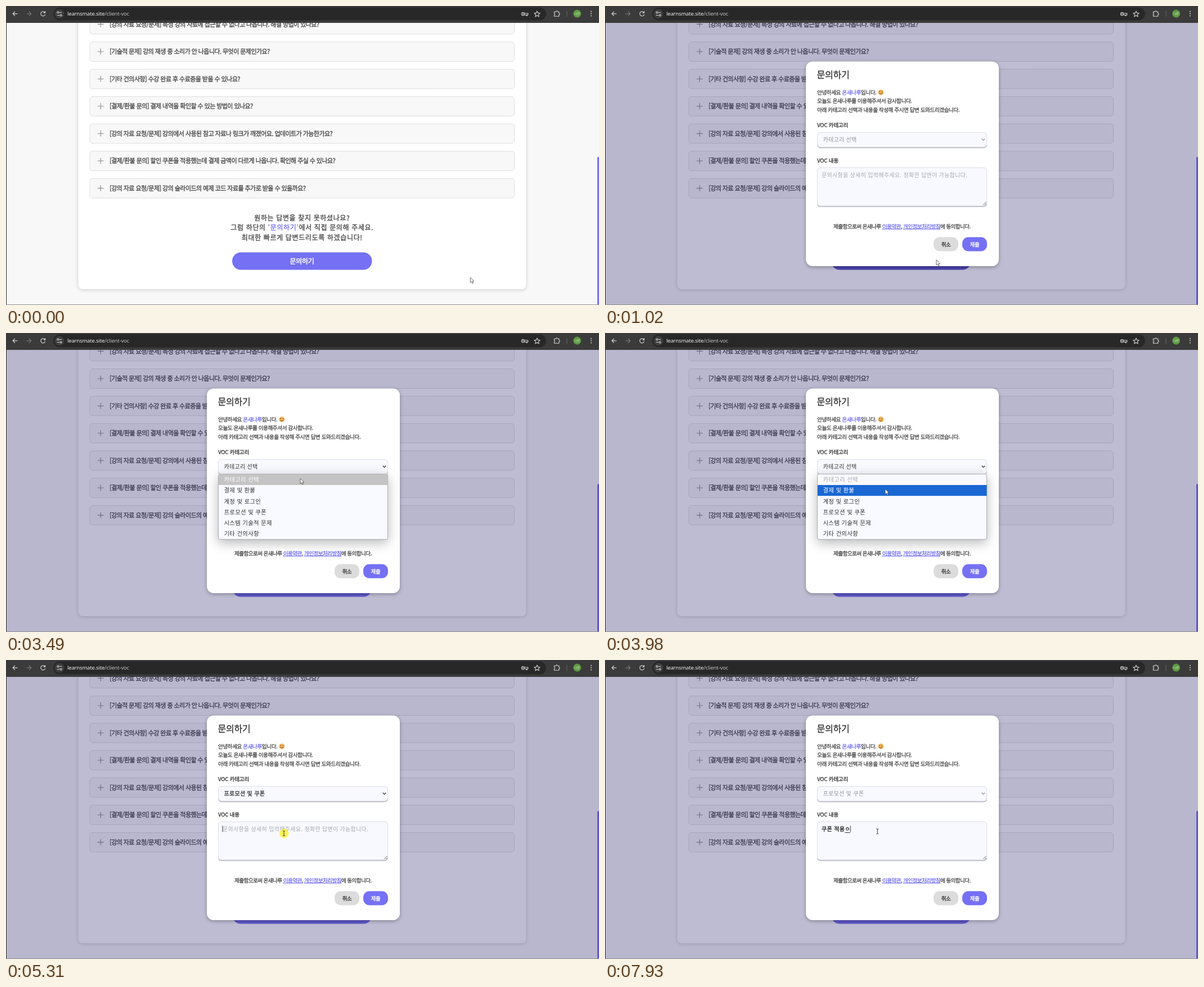
Animation of 1054 by 531 pixels, one loop 8000 ms. Source, as an HTML page:

```html
<!DOCTYPE html>
<html lang="ko">
<head>
<meta charset="utf-8">
<title>문의하기</title>
<style>
html, body { margin: 0; width: 100%; height: 100%; overflow: hidden; background: #f8f8f9; }
svg { display: block; width: 1054px; height: 531px; }
text { font-family: "Noto Sans CJK KR", "Noto Sans CJK", "Noto Sans", sans-serif; white-space: pre; }
.url { font-family: "Noto Sans", "Open Sans", sans-serif; }
.card { filter: drop-shadow(0 1px 3px rgba(0,0,0,.18)); }
.modal { filter: drop-shadow(0 2px 3px rgba(0,0,0,.3)); }
.menu { filter: drop-shadow(0 6px 10px rgba(0,0,0,.28)); }
</style>
</head>
<body>
<svg id="stage" viewBox="0 0 1054 531"></svg>
<script>
const LOOP = 8000;
const BRAND = '온새나루';
const PURPLE = '#7570f4', HOVER = '#5a54c9';
// outline widths that thicken the regular face
const MEDIUM = 0.3, SEMI = 0.45;

const rect = (x, y, w, h, r, fill, more = '') =>
  `<rect x="${x}" y="${y}" width="${w}" height="${h}" rx="${r}" fill="${fill}" ${more}/>`;
const line = (d, stroke, w = 1, more = '') =>
  `<path d="${d}" fill="none" stroke="${stroke}" stroke-width="${w}" ${more}/>`;
const text = (x, y, s, size, gap, fill, heavy = 0, more = '') =>
  `<text x="${x}" y="${y}" font-size="${size}" letter-spacing="${gap}" fill="${fill}" stroke="${fill}" stroke-width="${heavy}" ${more}>${s}</text>`;
const mid = 'text-anchor="middle"';
const group = (id, body, more = '') => `<g id="${id}" ${more}>${body}</g>`;
const span = (s, more = '') => `<tspan fill="${PURPLE}" stroke="${PURPLE}" ${more}>${s}</tspan>`;

const questions = [
  '[강의 자료 요청/문제] 특정 강의 자료에 접근할 수 없다고 나옵니다. 해결 방법이 있나요?',
  '[기술적 문제] 강의 재생 중 소리가 안 나옵니다. 무엇이 문제인가요?',
  '[기타 건의사항] 수강 완료 후 수료증을 받을 수 있나요?',
  '[결제/환불 문의] 결제 내역을 확인할 수 있는 방법이 있나요?',
  '[강의 자료 요청/문제] 강의에서 사용된 참고 자료나 링크가 깨졌어요. 업데이트가 가능한가요?',
  '[결제/환불 문의] 할인 쿠폰을 적용했는데 결제 금액이 다르게 나옵니다. 확인해 주실 수 있나요?',
  '[강의 자료 요청/문제] 강의 슬라이드의 예제 코드 자료를 추가로 받을 수 있을까요?'
];
const options = ['카테고리 선택', '결제 및 환불', '계정 및 로그인', '프로모션 및 쿠폰', '시스템 기술적 문제', '기타 건의사항'];
const rowTop = i => 250.7 + i * 19.25;

function page() {
  const items = questions.map((q, i) => {
    const y = 32.4 + i * 48.53;
    return rect(149, y - 17.2, 754.5, 34.6, 5, '#f8f8f8', 'stroke="#dedede"') +
      line(`M162.8 ${y}h10.8M168.2 ${y - 5.4}v10.8`, '#8a8a8a', 1.1) +
      text(184, y + 4.1, q, 11, -0.56, '#444', MEDIUM);
  }).join('');
  const note = (y, s) => text(526.3, y, s, 12, 0.64, '#444', MEDIUM, mid);
  return rect(0, 30, 1054, 501, 0, '#f8f8f9') +
    rect(128.5, -20, 796, 523, 8, '#fff', 'class="card"') + items +
    note(381, '원하는 답변을 찾지 못하셨나요?') +
    note(398, `그럼 하단의 ${span("'문의하기'")}에서 직접 문의해 주세요.`) +
    note(415.5, '최대한 빠르게 답변드리도록 하겠습니다!') +
    rect(402, 437.6, 248.5, 30.9, 15.4, PURPLE, 'id="ask"') +
    text(525.7, 457.6, '문의하기', 12.5, -0.75, '#fff', SEMI, mid) +
    rect(1051, 268, 4, 263, 2, PURPLE);
}

function field(y, h) {
  return rect(377, y + 1, 302, h, 6, '#b9bac2') +
    rect(377.5, y + 0.5, 301, h - 1.5, 5.5, '#f8f9fe', 'stroke="#dddee6"');
}

function smiley() {
  return '<circle cx="490.3" cy="153.4" r="4.9" fill="#f0b055"/>' +
    line('M487 152.5q1.1-1.7 2.2 0M491.4 152.5q1.1-1.7 2.2 0M487.5 155q2.8 2.4 5.6 0', '#6b4520', 0.8);
}

function dialog() {
  const under = 'text-decoration="underline"';
  const small = (x, y, s, gap = -0.43, more = '') => text(x, y, s, 9.6, gap, '#4a4a4a', MEDIUM, more);
  const button = (x, fill, s, ink) => rect(x, 410.5, 44, 25, 11, fill) +
    text(x + 22, 426.6, s, 9.4, -0.3, ink, MEDIUM, mid);
  return rect(0, 30, 1054, 501, 0, 'rgb(42,35,108)', 'opacity=".3"') +
    rect(357, 98.5, 343, 363.5, 12, '#fff', 'class="modal"') +
    text(376.5, 128, '문의하기', 16, -0.2, '#333', MEDIUM) +
    small(377, 157, `안녕하세요 ${span(BRAND)}입니다.`) + smiley() +
    small(377, 172.4, `오늘도 ${BRAND}를 이용해주셔서 감사합니다.`) +
    small(377, 187.7, '아래 카테고리 선택과 내용을 작성해 주시면 답변 도와드리겠습니다.') +
    text(377, 215, 'VOC 카테고리', 9.6, -0.2, '#333', MEDIUM) +
    field(224, 27.5) +
    text(387.5, 240.6, '', 10, 0.3, '#333', 0, 'id="choice"') +
    line('M669.8 235.8l2.7 2.8 2.7-2.8', '#333', 1.3, 'id="chevron"') +
    text(377, 277.7, 'VOC 내용', 9.6, -0.2, '#333', MEDIUM) +
    field(286.5, 69.5) +
    line('M672 353.5l5.5-5.5M675 353.8l2.7-2.7', '#555', 0.9) +
    text(385, 304, '문의사항을 상세히 입력해주세요. 정확한 답변이 가능합니다.', 10, 0.3, '#a8aab2', 0, 'id="hint"') +
    text(385, 304, '', 10, 0.33, '#222', MEDIUM, 'id="typed"') +
    rect(0, 306, 9.3, 0.9, 0, '#222', 'id="compose"') +
    rect(384.5, 294.5, 0.9, 11, 0, '#222', 'id="caret"') +
    small(527.8, 394.6, `제출함으로써 ${BRAND} ${span('이용약관', under)}, ${span('개인정보처리방침', under)}에 동의합니다.`, -0.58, mid) +
    button(584, '#dcdcdc', '취소', '#333') + button(635, PURPLE, '제출', '#fff') +
    group('menu',
      rect(377.5, 250.5, 301, 116, 3, '#f9faff', 'class="menu" stroke="#a9abb5"') +
      rect(378, 0, 300.5, 19.25, 0, '#1967d2', 'id="pick"') +
      options.map((s, i) => text(387.5, rowTop(i) + 13.3, s, 10.4, 0.3, '#333', 0, 'class="opt"')).join(''));
}

function toolbar() {
  const c = '#d5d5d5';
  return rect(0, 0, 1054, 30, 0, '#3b3b3b') +
    rect(84, 2.5, 876, 23, 11.5, '#282828') +
    line('M20.5 13.8h-8M16 10l-3.8 3.8 3.8 3.8', c, 1.2) +
    line('M36.5 13.8h8M41 10l3.8 3.8-3.8 3.8', '#777', 1.2) +
    line('M69 11.3a4 4 0 1 0 .7 3.6M69.6 9.3v2.8h-2.8', c, 1.2) +
    '<circle cx="95" cy="14" r="8.5" fill="#3e3e3e"/>' +
    line('M95 11.5h4.2M95 16.5h-4.2', c, 1.2) +
    `<g fill="none" stroke="${c}" stroke-width="1.1"><circle cx="92.4" cy="11.5" r="1.5"/><circle cx="97.6" cy="16.5" r="1.5"/>` +
    '<circle cx="919" cy="14.2" r="2.6"/><path d="M921.6 13h6.2v2.8h-1.4v1.3h-1.8v-1.3h-3"/>' +
    '<path d="M944 9.2l1.5 3.2 3.5.4-2.6 2.4.7 3.5-3.1-1.8-3.1 1.8.7-3.5-2.6-2.4 3.5-.4z"/>' +
    '<path d="M974.5 10.2h3a1.4 1.4 0 0 1 2.8 0h2.5v2.6a1.4 1.4 0 0 1 0 2.8v2.7h-8.3v-2.6a1.5 1.5 0 0 0 0-2.8z"/></g>' +
    `<circle cx="919" cy="14.2" r=".9" fill="${c}"/>` +
    text(109, 17.4, 'learnsmate.site<tspan fill="#bdbdbd">/client-voc</tspan>', 9.5, -0.18, '#eee', 0, 'class="url"') +
    line('M997 9v10', '#666') +
    '<circle cx="1015.2" cy="13.6" r="7" fill="#5d9a41"/>' +
    text(1015.2, 15.6, '나무', 5.4, -0.2, '#e8f2e2', 0, mid) +
    [9.8, 13.6, 17.4].map(y => `<circle cx="1040" cy="${y}" r="1" fill="${c}"/>`).join('');
}

const pointers =
  group('glow', '<circle r="8.3" fill="#fff01e"/>') +
  group('arrow', '<path d="M0 0v9.4l2.2-2 1.5 3.4 1.5-.7-1.5-3.3h3z" fill="#fff" stroke="#333" stroke-width=".7" stroke-linejoin="round"/>') +
  group('hand', '<path d="M-.9 1a1 1 0 0 1 2 0v3.4l4 .8q1 .3.9 1.4l-.5 3.2-1 2.8h-4.3l-3-4.2q-.5-1 .6-1.2l1.3 1z" fill="#fff" stroke="#222" stroke-width=".7" stroke-linejoin="round"/>') +
  group('beam', line('M-2-4.5q2 0 2 1v7q0 1-2 1M2-4.5q-2 0-2 1M2 4.5q-2 0-2-1', '#333', 1));

const stage = document.getElementById('stage');
stage.innerHTML = page() + group('dialog', dialog()) + toolbar() +
  rect(0, 30, 1, 501, 0, '#2b2b2b') + rect(0, 530, 1054, 1, 0, '#8d8d92') + pointers;

const el = id => document.getElementById(id);
const show = (id, on) => el(id).setAttribute('visibility', on ? 'inherit' : 'hidden');
const within = (t, a, b) => t >= a && t < b;
const latest = (steps, t) => steps.reduce((v, s) => t >= s[0] ? s[1] : v, steps[0][1]);

// start, end, x, y reached
const moves = [
  [0, 0, 825.3, 482], [110, 120, 824.7, 481.4], [200, 840, 588.9, 450.8],
  [1450, 2130, 567, 230.5], [2950, 3770, 507, 268.5], [3780, 3980, 498, 277],
  [4240, 4710, 476, 318.5], [5020, 5260, 494, 308], [5380, 5450, 484.3, 304.3]
];
function cursorAt(t) {
  let [, , x, y] = moves[0];
  for (const [a, b, tx, ty] of moves.slice(1)) {
    if (t < a) break;
    const k = Math.min(1, (t - a) / (b - a)), e = k * k * (3 - 2 * k);
    x += (tx - x) * e;
    y += (ty - y) * e;
  }
  return [x, y];
}

const clicks = [[840, 1020, 0.56], [2060, 2220, 0.7], [4910, 5000, 0.65], [5250, 5400, 0.72]];

// time, settled text, syllable being composed
const keys = [[0, '', ''], [6120, 'z', ''], [6590, '', '']];
['|ㅋ', '|쿠', '|쿺', '쿠|포', '쿠|폰', '쿠폰 |', '쿠폰 |ㅈ', '쿠폰 |저', '쿠폰 |적', '쿠폰 적|ㅇ']
  .forEach((s, i) => keys.push([6920 + i * 84.4, ...s.split('|')]));
keys.push([7820, '쿠폰 적', '요'], [7880, '쿠폰 적', '용'], [7930, '쿠폰 적용', 'ㅇ']);

let shown = null;
let ends = [385, 385];
function drawTyping(t) {
  const [, done, part] = keys.filter(k => k[0] <= t).pop();
  const full = done + part, node = el('typed');
  if (shown !== done + '|' + part) {
    shown = done + '|' + part;
    ends = [done, full].map(s => {
      node.textContent = s;
      return 385 + (s ? node.getComputedTextLength() : 0);
    });
  }
  el('compose').setAttribute('x', ends[0] + 0.2);
  el('caret').setAttribute('x', full ? ends[1] : 384.5);
  return [full, part];
}

function draw(t) {
  const [x, y] = cursorAt(t);
  const open = t >= 1020, menu = within(t, 2130, 4980);
  show('dialog', open);
  show('menu', open && menu);

  const onAsk = !open && x > 402 && x < 650 && y > 438 && y < 468;
  el('ask').setAttribute('fill', onAsk || within(t, 1020, 1100) ? HOVER : PURPLE);

  const active = within(t, 2060, 5380), chosen = t >= 4980;
  const ink = active ? '#333' : '#94959b', choice = el('choice');
  choice.textContent = options[chosen ? 3 : 0];
  choice.setAttribute('fill', ink);
  choice.setAttribute('stroke', ink);
  choice.setAttribute('stroke-width', chosen && active ? MEDIUM : 0);
  el('chevron').setAttribute('stroke', ink);

  const row = latest([[0, 0], [3840, 1], [4380, 2], [4580, 3]], t);
  el('pick').setAttribute('y', rowTop(row));
  el('pick').setAttribute('fill', row ? '#1967d2' : '#c4c4c4');
  document.querySelectorAll('.opt').forEach((o, i) =>
    o.setAttribute('fill', i === row ? '#fff' : i ? '#333' : '#a9a9ad'));

  const [full, part] = drawTyping(t);
  show('hint', open && !full);
  show('typed', open);
  show('compose', open && part !== '');
  show('caret', within(t, 5310, 5850) || t >= 6120);

  const beam = open && !menu && t > 4980 && within(y, 287, 355);
  const kind = onAsk ? 'hand' : beam ? 'beam' : 'arrow';
  for (const id of ['arrow', 'hand', 'beam']) {
    show(id, id === kind);
    el(id).setAttribute('transform', `translate(${x} ${y})`);
  }
  const click = clicks.find(c => within(t, c[0], c[1]));
  show('glow', !!click);
  el('glow').setAttribute('opacity', click ? click[2] : 0);
  el('glow').setAttribute('transform', `translate(${x + 0.3} ${y + (beam ? 0 : 1)})`);
}

function tick() {
  draw(performance.now() % LOOP);
  requestAnimationFrame(tick);
}
tick();
</script>
</body>
</html>
```
